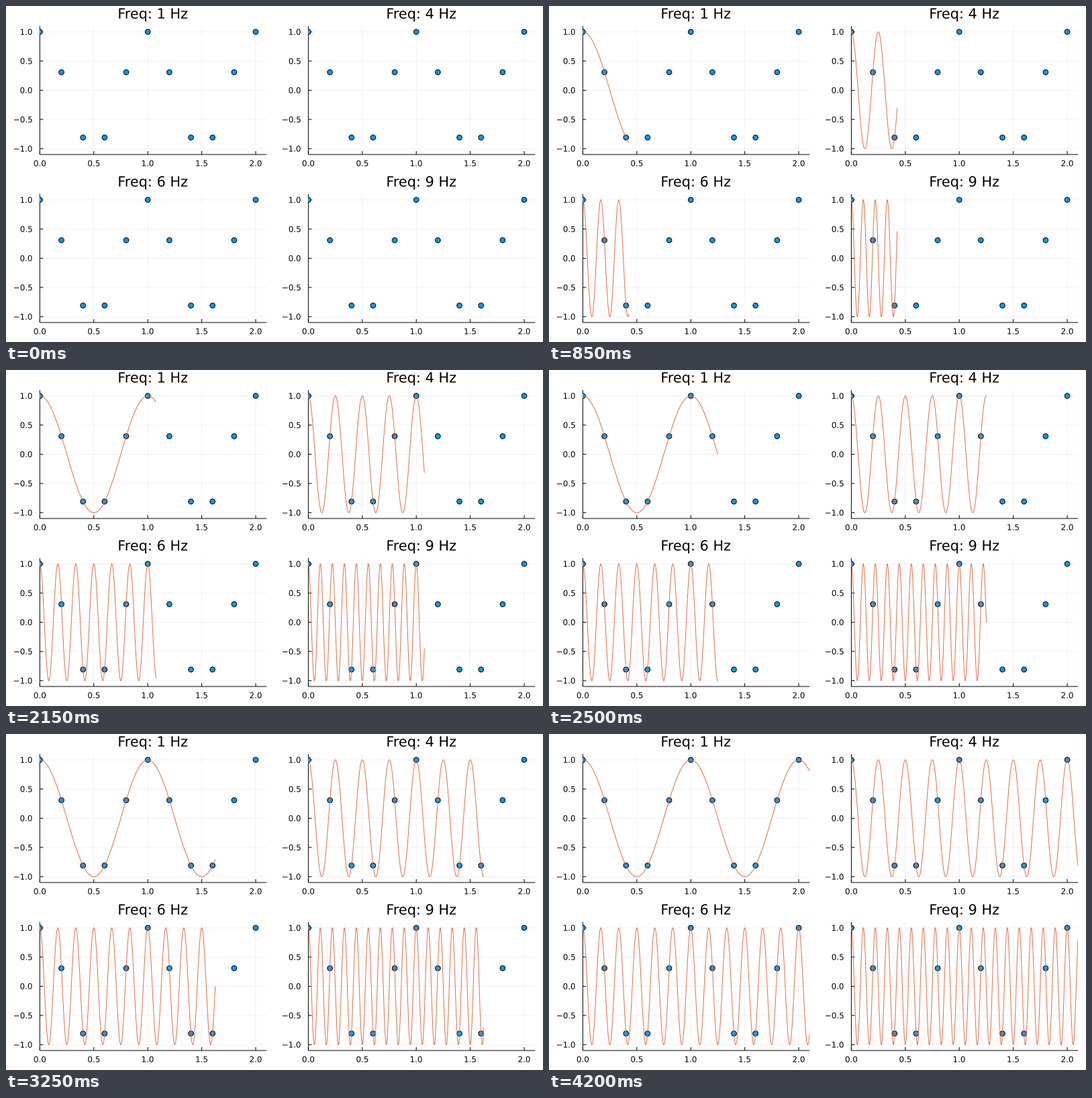
Write a matplotlib script that moves like this. It is 800 by 500 pixels and loops after 4.25 s.

```python
import numpy as np
import matplotlib.pyplot as plt
from matplotlib.animation import FuncAnimation
from matplotlib.patches import PathPatch
from matplotlib.textpath import TextPath
from matplotlib.transforms import Affine2D

W, H = 800, 500
PX = 0.72  # points per pixel at 100 dpi
FRAMES, STEP, SUB = 85, 0.025, 25
BLUE, ORANGE = (0, 0.6056, 0.9787), (0.8889, 0.4356, 0.2781)
BOX_W, BOX_H = 337.7, 191.2
X_MAX, Y_MAX = 2.1, 1.1
X_TICKS, Y_TICKS = np.arange(5) * 0.5, np.arange(-2, 3) * 0.5
TICK_SIZE, TITLE_SIZE = 11.9, 20.83
CAP = 0.729  # cap height in em

plt.rcParams["font.family"] = "DejaVu Sans"
plt.rcParams["path.simplify"] = False

fig = plt.figure(figsize=(W / 100, H / 100), dpi=100, facecolor="white")
t = np.arange((FRAMES - 1) * SUB + 1) * STEP / SUB
samples = np.arange(11) * 0.2


def label(x, y, text, size, anchor=0.5):
    """Outline text, vertically centred on y; anchor 0.5 centres, 1 right-aligns."""
    path = TextPath((0, 0), text, size=size)
    box = path.get_extents()
    move = Affine2D().translate(x - box.x0 - anchor * box.width,
                                H - y - CAP * size / 2)
    fig.add_artist(PathPatch(path, facecolor="black", linewidth=0, snap=False,
                             transform=move.scale(1 / W, 1 / H) + fig.transFigure))


def make_panel(left, top, freq):
    bottom = top + BOX_H
    ax = fig.add_axes([left / W, 1 - bottom / H, BOX_W / W, BOX_H / H])
    ax.set(xlim=(0, X_MAX), ylim=(-Y_MAX, Y_MAX))
    ax.axis("off")

    def rule(xs, ys, width=1, alpha=1, z=2):
        ax.plot(xs, ys, color="black", linewidth=width * PX, alpha=alpha, zorder=z,
                snap=False, clip_on=False, solid_capstyle="butt")

    tick_x, tick_y = 5 * X_MAX / BOX_W, 5 * 2 * Y_MAX / BOX_H
    for v in X_TICKS:
        rule([v, v], [-Y_MAX, Y_MAX], 0.5, 0.1, 1)
        rule([v, v], [-Y_MAX, tick_y - Y_MAX])
        label(left + v / X_MAX * BOX_W, bottom + 13, f"{v:.1f}", TICK_SIZE)
    for v in Y_TICKS:
        rule([0, X_MAX], [v, v], 0.5, 0.1, 1)
        rule([0, tick_x], [v, v])
        y = top + (Y_MAX - v) / (2 * Y_MAX) * BOX_H
        label(left - 11.7, y, f"{v:.1f}".replace("-", "\u2212"), TICK_SIZE, 1)
    rule([0, X_MAX], [-Y_MAX, -Y_MAX])
    rule([0, 0], [-Y_MAX, Y_MAX])
    label(left + BOX_W / 2, top - 18.8, f"Freq: {freq} Hz", TITLE_SIZE)

    # per-point sizes keep the markers at sub-pixel positions
    ax.scatter(samples, np.cos(2 * np.pi * samples),
               s=np.full(samples.size, (7.6 * PX) ** 2), color=[BLUE],
               edgecolors="black", linewidths=PX, zorder=3)
    line, = ax.plot([], [], color=ORANGE, linewidth=PX, zorder=4)
    return line, np.cos(2 * np.pi * freq * t)


panels = [make_panel(50.4 + 400 * (i % 2), 29.8 + 250 * (i // 2), f)
          for i, f in enumerate((1, 4, 6, 9))]


def update(n):
    end = n * SUB + 1 if n else 0
    for line, wave in panels:
        line.set_data(t[:end], wave[:end])
    return [line for line, _ in panels]


anim = FuncAnimation(fig, update, frames=FRAMES, interval=50,
                     repeat=True, repeat_delay=0, blit=False)
plt.show()
```
